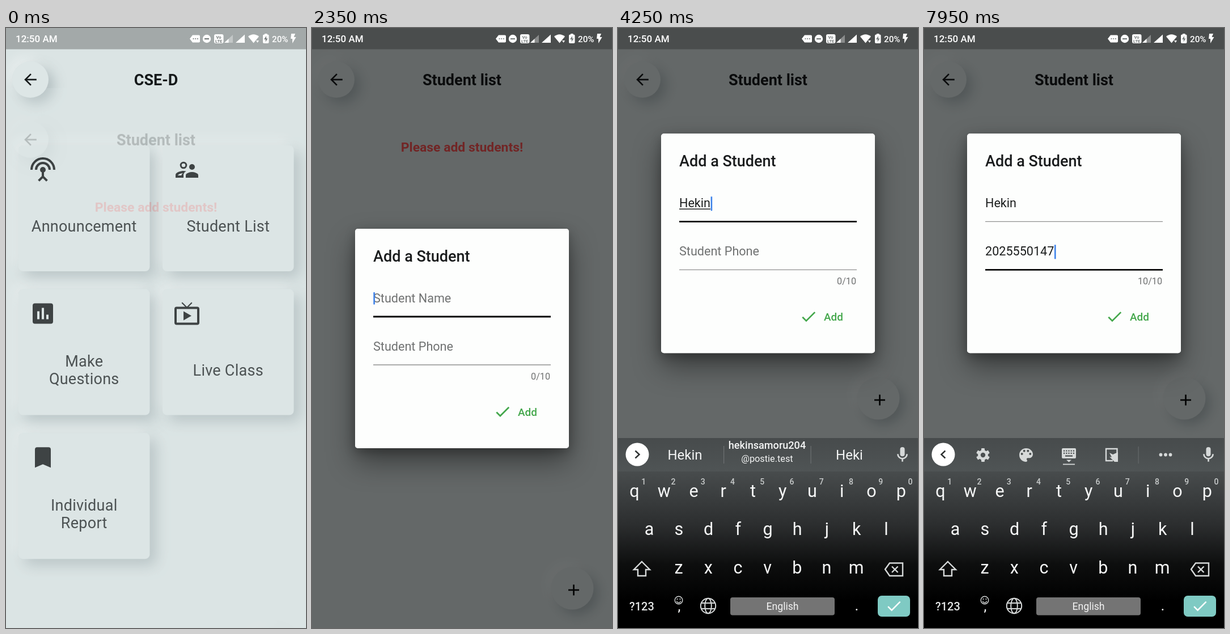
These frames come from a looping animation (529 px wide and 1058 px high, 8 s). An HTML page with a canvas:

```html
<!DOCTYPE html>
<html lang="en">
<head>
<meta charset="utf-8">
<title>Add a student</title>
<style>
html, body { margin: 0; width: 100%; height: 100%; overflow: hidden; background: #dbe4e4; }
canvas { display: block; }
</style>
</head>
<body>
<canvas id="stage" width="529" height="1058"></canvas>
<script>
const W = 529, H = 1058, LOOP = 8000;
const INK = '#15191a', BG = '#dbe4e4', SOFT = '#d6d9d9';
const NAME = 'Hekin', PHONE = '2025550147';
const NAME_KEYS = [3300, 3700, 3850, 4000, 4200];
const PHONE_KEYS = [6150, 6400, 6650, 6850, 7000, 7200, 7400, 7550, 7700, 7850];
const NAME_FOCUS = 2150, PHONE_FOCUS = 5350, KEYBOARD_AT = 2540;

const stage = document.getElementById('stage').getContext('2d');
const scratch = Object.assign(document.createElement('canvas'), { width: W, height: H }).getContext('2d');
let g = stage;

// ---- timing ----
const clamp = v => Math.max(0, Math.min(1, v));
const ramp = (t, from, to) => clamp((t - from) / (to - from));
const mix = (a, b, p) => a + (b - a) * p;
const typed = (times, t) => times.filter(k => k <= t).length;

function bezier(x1, y1, x2, y2) {
  const at = (a, b, s) => 3 * a * s * (1 - s) ** 2 + 3 * b * s * s * (1 - s) + s ** 3;
  return x => {
    let lo = 0, hi = 1;
    for (let i = 0; i < 24; i++) {
      const mid = (lo + hi) / 2;
      if (at(x1, x2, mid) < x) lo = mid; else hi = mid;
    }
    return at(y1, y2, lo);
  };
}
const fastOutSlowIn = bezier(.4, 0, .2, 1);
const easeIn = bezier(.42, 0, 1, 1);

// ---- drawing helpers ----
function text(s, x, y, size, color, weight = 400, align = 'left', spacing = 0) {
  g.font = `${weight} ${size}px Roboto, sans-serif`;
  g.textAlign = align;
  g.letterSpacing = spacing + 'px';
  g.fillStyle = color;
  g.fillText(s, x, y);
}
function box(x, y, w, h, color, r = 0) {
  g.fillStyle = color;
  g.beginPath();
  g.roundRect(x, y, w, h, r);
  g.fill();
}
function disc(x, y, r, color) {
  g.fillStyle = color;
  g.beginPath();
  g.arc(x, y, r, 0, 7);
  g.fill();
}
function arc(x, y, r, color, width, from = 0, to = 2 * Math.PI) {
  g.strokeStyle = color;
  g.lineWidth = width;
  g.beginPath();
  g.arc(x, y, r, from, to);
  g.stroke();
}
function line(color, width, ...p) {
  g.strokeStyle = color;
  g.lineWidth = width;
  g.beginPath();
  for (let i = 0; i < p.length; i += 2) g.lineTo(p[i], p[i + 1]);
  g.stroke();
}
function shape(path, color) {
  g.fillStyle = color;
  g.fill(new Path2D(path), 'evenodd');
}
// Draws in a 24-unit icon space whose middle lies at x, y
function icon(x, y, scale, draw) {
  g.save();
  g.translate(x, y);
  g.scale(scale, scale);
  g.translate(-12, -12);
  draw();
  g.restore();
}
function group(alpha, dy, draw) {
  if (alpha <= 0) return;
  if (alpha >= 1 && !dy) return draw();
  g = scratch;
  g.clearRect(0, 0, W, H);
  draw();
  g = stage;
  g.globalAlpha = alpha;
  g.drawImage(scratch.canvas, 0, dy);
  g.globalAlpha = 1;
}
function shadow(color, dx, dy, blur) {
  g.shadowColor = color;
  g.shadowOffsetX = dx;
  g.shadowOffsetY = dy;
  g.shadowBlur = blur;
}
function raised(x, y, w, h, r, depth, color = BG) {
  g.save();
  shadow('rgba(255,255,255,.38)', -depth * .8, -depth * .8, depth * 2);
  box(x, y, w, h, color, r);
  shadow('rgba(120,135,140,.42)', depth, depth, depth * 2.2);
  box(x, y, w, h, color, r);
  g.restore();
}

// ---- pages ----
function header(title) {
  box(0, 0, W, H, BG);
  raised(11, 59, 64, 64, 32, 10, '#dde6e6');
  icon(43, 91, 1.35, () => {
    line(INK, 2, 20, 12, 6, 12);
    line(INK, 2, 12.7, 4.7, 5.4, 12, 12.7, 19.3);
  });
  text(title, W / 2, 101, 27, INK, 700, 'center');
}

const icons = {
  antenna() {
    arc(12, 12, 10, INK, 2, Math.PI, 0);
    arc(12, 12, 6, INK, 2, Math.PI, 0);
    disc(12, 12, 2.5, INK);
    line(INK, 2, 12, 13, 12, 18);
    line(INK, 2, 8.3, 21.7, 12, 18, 15.7, 21.7);
  },
  people() {
    arc(9, 8, 2.4, INK, 1.5);
    disc(16.5, 9.5, 2.5, INK);
    shape('M16.5 14c-1.83 0-5.5.92-5.5 2.75V19h11v-2.25c0-1.83-3.67-2.75-5.5-2.75z', INK);
    shape('M9 13c-2.33 0-7 1.17-7 3.5V19h7v-2.25c0-.85.33-2.34 2.37-3.47C10.5 13.1 9.66 13 9 13zM4 17c.3-.8 2-1.7 4.4-2-.9.8-1.2 1.4-1.3 2z', INK);
  },
  chart() {
    shape('M5 3h14q2 0 2 2v14q0 2-2 2H5q-2 0-2-2V5q0-2 2-2zM7 10v7h2v-7zM11 7v10h2V7zM15 13v4h2v-4z', INK);
  },
  tv() {
    g.strokeStyle = INK;
    g.lineWidth = 2;
    g.beginPath();
    g.roundRect(2, 7, 20, 14, 1);
    g.stroke();
    line(INK, 1, 7.6, 2.3, 12, 6.7, 16.4, 2.3);
    shape('M9 10v8l7-4z', INK);
  },
  bookmark() {
    shape('M17 3H7q-2 0-2 2v16l7-3 7 3V5q0-2-2-2z', INK);
  }
};
const cards = [
  ['antenna', 'Announcement'], ['people', 'Student List'],
  ['chart', 'Make', 'Questions'], ['tv', 'Live Class'],
  ['bookmark', 'Individual', 'Report']
];
function menuPage() {
  header('CSE-D');
  cards.forEach(([kind, ...rows], i) => {
    const x = 22 + (i % 2) * 254, y = 207 + (i >> 1) * 253.6;
    raised(x, y, 231.5, 222, 8, 11, '#dce5e5');
    icon(x + 43, y + 43, 2, icons[kind]);
    rows.forEach((s, k) =>
      text(s, x + 115.7, y + 152 + k * 31.3 - (rows.length - 1) * 15.6, 27, '#272c2d', 400, 'center', .25));
  });
}

function addButton(dy, press) {
  const x = 459, y = 988 - dy;
  raised(x - 37.5, y - 37.5, 75, 75, 37.5, mix(9, 6, press));
  if (press > 0) arc(x, y, 37.3, `rgba(70,185,155,${.75 * press})`, 1);
  line('#060808', 2.7, x - 7, y + 3, x + 12, y + 3);
  line('#060808', 2.7, x + 2.5, y - 6.5, x + 2.5, y + 12.5);
}
function listPage(t) {
  header('Student list');
  text('Please add students!', W / 2, 218, 22.9, '#f75252', 700, 'center');
  const press = ramp(t, 1130, 1230) * (1 - ramp(t, 1350, 1550));
  addButton(t >= KEYBOARD_AT ? 335 : 0, press);
}

// ---- dialog ----
function caretOn(t) {
  const last = Math.max(...[NAME_FOCUS, ...NAME_KEYS, PHONE_FOCUS, ...PHONE_KEYS].filter(k => k <= t));
  return Math.floor((t - last) / 500) % 2 === 0;
}
function field(y, hint, value, focus, active, composing, t) {
  text(value || hint, 108, y, 21.6, value ? '#1b1d1d' : '#707272');
  const end = 108 + (value ? g.measureText(value).width : 0);
  if (composing && value) box(108, y + 2.3, end - 108, 1.4, '#1b1d1d');
  const shade = Math.round(mix(145, 8, focus)), h = mix(1.35, 2.8, focus);
  box(108, y + 25 - h / 2, 313, h, `rgb(${shade},${shade},${shade})`);
  if (active && caretOn(t)) {
    if (value) box(end + .6, y - 19, 2.6, 25, '#3d82ea');
    else box(108.3, y - 18, 2.6, 21.5, '#3d82ea');
  }
}
function dialog(t) {
  const rise = 1 - (1 - ramp(t, KEYBOARD_AT, KEYBOARD_AT + 110)) ** 2;
  const top = mix(354, 186.3, rise);
  g.save();
  shadow('rgba(0,0,0,.42)', 0, 24, 50);
  box(76, top, 377, 387, '#fdfefd', 5);
  shadow('rgba(0,0,0,.25)', 0, 6, 18);
  box(76, top, 377, 387, '#fdfefd', 5);
  g.restore();
  text('Add a Student', 108, top + 58, 27, '#1a1c1d', 500);

  const onPhone = t >= PHONE_FOCUS;
  const swap = ramp(t, PHONE_FOCUS, PHONE_FOCUS + 200);
  const digits = typed(PHONE_KEYS, t);
  field(top + 130, 'Student Name', NAME.slice(0, typed(NAME_KEYS, t)),
    ramp(t, NAME_FOCUS, NAME_FOCUS + 200) * (1 - swap), t >= NAME_FOCUS && !onPhone, !onPhone, t);
  field(top + 215, 'Student Phone', PHONE.slice(0, digits), swap, onPhone, false, t);
  text(digits + '/10', 420, top + 266, 16.2, '#6f7171', 400, 'right');

  icon(336, top + 322.5, 1.35, () => line('#43a74b', 2, 4.1, 12.7, 9, 17.6, 20.3, 6.3));
  text('Add', 363, top + 329.7, 18.9, '#43a74b', 500);
}

// ---- keyboard ----
function gear() {
  g.save();
  g.translate(12, 12);
  for (let i = 0; i < 6; i++) {
    g.rotate(Math.PI / 3);
    box(-2.5, -10, 5, 5, SOFT, 1);
  }
  g.restore();
  arc(12, 12, 5.5, SOFT, 4);
}
function palette() {
  shape('M12 3c-5 0-9 4-9 9s4 9 9 9c.8 0 1.5-.7 1.5-1.5 0-1-.8-1-.8-2 0-.8.7-1.5 1.5-1.5H16c2.8 0 5-2.2 5-5 0-4.4-4-8-9-8z', SOFT);
  for (const [x, y] of [[6.5, 10.5], [9.5, 6.5], [14.5, 6.5], [17.5, 10.5]]) disc(x, y, 1.5, '#4a4f50');
}
function mic() {
  box(9, 2, 6, 12, SOFT, 3);
  arc(12, 11, 6, SOFT, 2, 0, Math.PI);
  line(SOFT, 2, 12, 17, 12, 21);
}
function tools() {
  icon(104, 753, 1.2, gear);
  icon(180, 753, 1.33, palette);
  box(243, 741, 25, 18, SOFT, 2);
  for (let i = 0; i < 10; i++) box(246 + (i % 5) * 4.2, 744.5 + (i > 4) * 4.2, 2.2, 2.2, '#4a4f50');
  box(249, 753.5, 13, 2.2, '#4a4f50');
  shape('M251 761.5h9l-4.500 4z', SOFT);
  box(245, 768.5, 21, 1.8, SOFT);
  line(SOFT, 2.4, 333, 763, 321, 763, 321, 742, 340.500, 742, 340.500, 750);
  shape('M327 749l6 3 9-4v17h-6l-9-9 4 1z', SOFT);
  box(377.500, 738, 1.2, 30, '#65696a');
  for (const x of [417.500, 426, 434.500]) disc(x, 752.5, 2.9, SOFT);
}
function suggestions(word) {
  text(word, 118, 761, 24, '#f4f5f5', 400, 'center');
  text('hekinsamoru204', 263, 742, 18.1, '#f4f5f5', 500, 'center');
  text('@postie.test', 263, 765, 16.3, '#f4f5f5', 400, 'center');
  text('Heki', 408, 761, 24, '#f4f5f5', 400, 'center');
  box(186, 737, 1.2, 31, '#6d7172');
  box(339.500, 737, 1.2, 31, '#6d7172');
}
function keys() {
  const letter = (s, x, y) => text(s, x, y, 30.5, '#f6f7f7', 400, 'center');
  [...'qwertyuiop'].forEach((s, i) => {
    const x = 29 + i * 52.25;
    letter(s, x, 827);
    text((i + 1) % 10, x + 16.3, 805, 14, '#c9cccc', 500, 'center');
  });
  [...'asdfghjkl'].forEach((s, i) => letter(s, 55 + i * 52.25, 894));
  [...'zxcvbnm'].forEach((s, i) => letter(s, 107 + i * 52.2, 962));

  line(SOFT, 2.4, 42, 941, 56, 955, 49, 955, 49, 966, 35, 966, 35, 955, 28, 955, 42, 941, 43, 942);
  line(SOFT, 2.4, 471, 954.5, 479, 943.5, 502, 943.5, 502, 966, 479, 966, 471, 954.5, 472, 953);
  line(SOFT, 2.4, 483, 949.5, 493.500, 960);
  line(SOFT, 2.4, 493.500, 949.5, 483, 960);

  text('?123', 20, 1027, 20, '#e4e6e6', 500);
  arc(107, 1009, 6.8, SOFT, 1.4);
  arc(107, 1010, 3.5, SOFT, 1.3, .1, 3);
  disc(104.500, 1007, 1.1, SOFT);
  disc(109.500, 1007, 1.1, SOFT);
  text(',', 108, 1028, 22, '#f0f1f1', 500, 'center');

  arc(159, 1019, 13.2, SOFT, 2);
  g.beginPath();
  g.ellipse(159, 1019, 5.8, 13.2, 0, 0, 7);
  g.stroke();
  line(SOFT, 2, 147, 1014, 171, 1014);
  line(SOFT, 2, 147, 1024, 171, 1024);

  box(198, 1004, 184, 31.5, '#747474', 4);
  text('English', 290, 1026, 17.7, '#f4f4f4', 400, 'center');
  text('.', 421, 1027, 26, '#f0f1f1', 400, 'center');
  box(458, 1001, 57, 37, '#7fcac3', 7);
  icon(486.500, 1019.5, 1.3, () => line('#fff', 1.9, 4, 12.5, 9, 17.5, 20.5, 6));
}
function keyboard(t) {
  const p = ramp(t, 2600, 2900);
  if (p <= 0) return;
  g.save();
  g.translate(0, 335 * (1 - p) ** 1.25);
  const fade = g.createLinearGradient(0, 782, 0, 1010);
  fade.addColorStop(0, '#484c4d');
  fade.addColorStop(.42, '#2b2d2e');
  fade.addColorStop(.72, '#0d0e0e');
  fade.addColorStop(1, '#000');
  box(0, 782, W, 276, fade);
  const bar = g.createLinearGradient(0, 723, 0, 782);
  bar.addColorStop(0, '#474b4c');
  bar.addColorStop(1, '#4f5455');
  box(0, 723, W, 59, bar);

  const count = typed(NAME_KEYS, t);
  const hints = count > 0 && t < PHONE_FOCUS + 30;
  const way = hints ? 1 : -1;
  disc(34, 752, 20.5, '#fff');
  line('#2d3030', 2.4, 34 - way * 3.5, 745.5, 34 + way * 3.5, 752, 34 - way * 3.5, 758.5);
  if (hints) suggestions(NAME.slice(0, count)); else tools();
  icon(501.500, 752.5, 1.35, mic);
  keys();
  g.restore();
}

// ---- status bar ----
function statusBar() {
  const dim = '#777d7d';
  box(0, 0, W, 37.5, 'rgba(0,0,0,.26)');
  text('12:50 AM', 17, 25, 17, '#fff', 500);
  shape('M329 12.500h11q2 0 2 2v9q0 2-2 2h-11l-5-6.500z', '#fff');
  for (let i = 0; i < 3; i++) disc(330.500 + i * 3.7, 19, 1.1, dim);
  disc(354, 19, 7.2, '#fff');
  box(350, 18, 8, 2.2, dim);
  box(367, 11, 16.500, 16, '#fff', 3);
  text('Vo', 375, 18.5, 7.5, dim, 700, 'center');
  text('LTE', 375.200, 25.7, 7.5, dim, 700, 'center');
  shape('M400 12v14h-15z', 'rgba(255,255,255,.35)');
  shape('M392.500 19v7h-7.500z', '#fff');
  shape('M421 11.500v14.500h-16z', '#fff');
  shape('M427 15q9.500-7.500 19 0l-9.500 11.500z', '#fff');
  shape('M441 22h5l-2.500 4z', '#fff');
  box(456, 10, 4.500, 3, '#fff', .5);
  box(453, 11.5, 10.500, 15.5, '#fff', 2);
  shape('M459 14l-4 6h2.700v4.500l3.800-6h-2.500z', dim);
  text('20%', 469, 25, 15.2, '#fff', 500);
  shape('M503 10h7l-2.500 6h4l-6.500 11v-8h-3z', '#fff');
}

function draw(t) {
  const enter = clamp(.39 + t / 300);
  if (enter < 1) {
    menuPage();
    group(easeIn(enter), 264.5 * (1 - fastOutSlowIn(enter)), () => listPage(t));
  } else {
    listPage(t);
  }
  const open = ramp(t, 1320, 1500);
  if (open > 0) box(0, 0, W, H, `rgba(0,0,0,${.54 * open})`);
  statusBar();
  group(open, 0, () => dialog(t));
  keyboard(t);
}

function tick() {
  draw(performance.now() % LOOP);
  requestAnimationFrame(tick);
}
tick();
</script>
</body>
</html>
```
